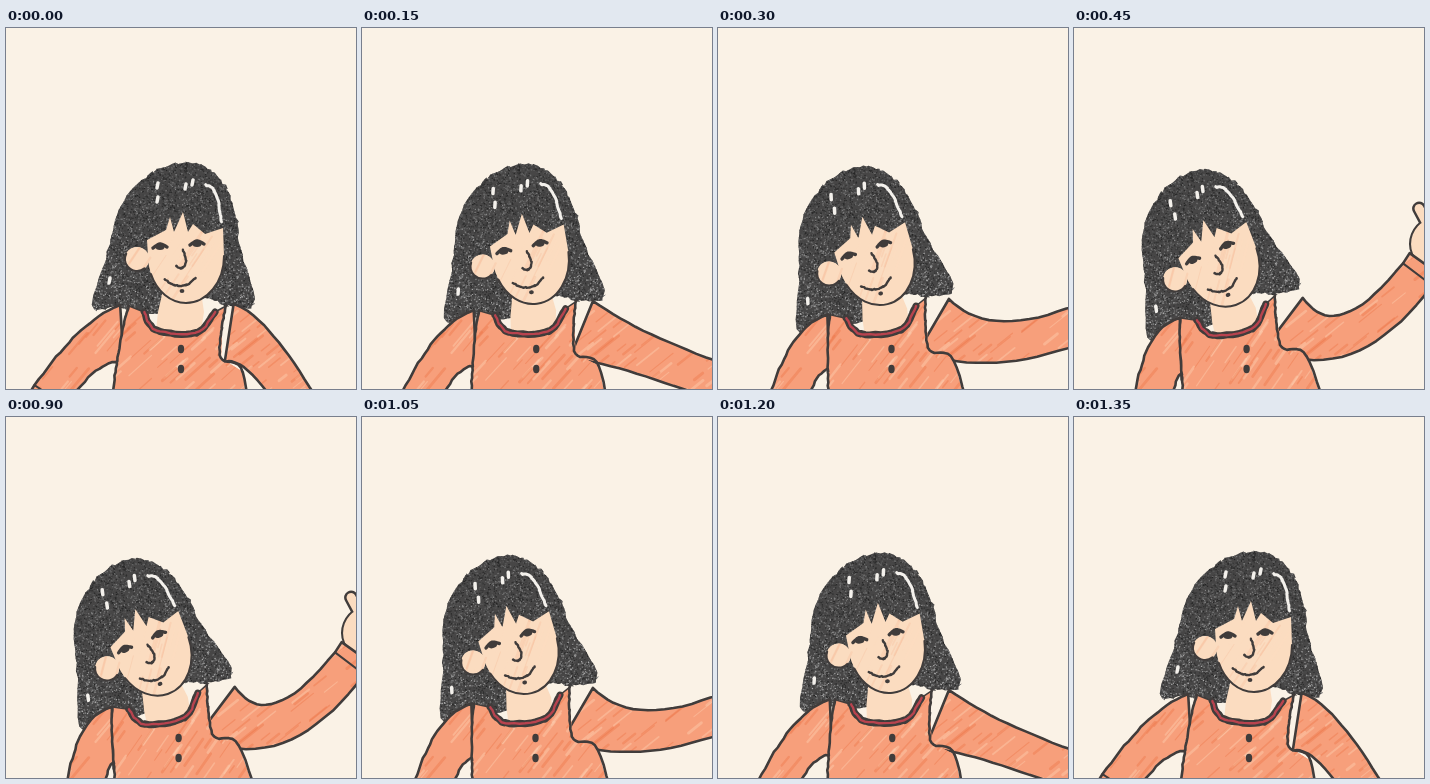
Recreate the animation shown at these times as an HTML page with a canvas. Size 350 by 361 pixels, loop 1.5 s.

```html
<!DOCTYPE html>
<html lang="en">
<head>
<meta charset="utf-8">
<title>Waving girl</title>
<style>
  html, body { margin: 0; width: 100%; height: 100%; overflow: hidden; background: #faf2e6; }
  canvas { display: block; }
</style>
</head>
<body>
<canvas id="stage" width="350" height="361"></canvas>
<script>
const ctx = document.getElementById('stage').getContext('2d');
const PAPER = '#faf2e6', INK = '#403c3b', SKIN = '#fbdcc0', ORANGE = '#f79f7b';
const STEP = 150;

// lift drives head, torso and hanging arm; elbow and wrist bend the waving arm
const waves = [
  { lift: 0, elbow: [262, 312], wrist: [322, 430] },
  { lift: 0.25, elbow: [290, 330], wrist: [400, 370] },
  { lift: 0.5, elbow: [285, 338], wrist: [400, 278] },
  { lift: 0.8, elbow: [275, 343], wrist: [351, 236] },
  { lift: 1, elbow: [268, 235], wrist: [274, 146] }
];
const sequence = [...waves, ...waves.slice().reverse()];

const lerp = (a, b, t) => a + (b - a) * t;
const radians = degrees => degrees * Math.PI / 180;
let random;
function seed(value) {
  random = () => (value = (value * 16807) % 2147483647) / 2147483647;
}

function polygon(points, closed = true) {
  const path = new Path2D();
  points.forEach(([x, y]) => path.lineTo(x, y));
  if (closed) path.closePath();
  return path;
}

// Samples a Catmull-Rom spline through the points, with a slightly shaky hand
function sketch(points, closed = false, shake = 0.5) {
  const n = points.length, samples = [];
  const at = i => points[closed ? (i + n) % n : Math.max(0, Math.min(n - 1, i))];
  for (let i = 0; i < (closed ? n : n - 1); i++) {
    const [a, b, c, d] = [at(i - 1), at(i), at(i + 1), at(i + 2)];
    for (let t = 0; t <= 1; t += 0.125) {
      samples.push([0, 1].map(k => b[k] + 0.5 * t * (c[k] - a[k] +
        t * (2 * a[k] - 5 * b[k] + 4 * c[k] - d[k] + t * (3 * (b[k] - c[k]) + d[k] - a[k]))) +
        (random() - 0.5) * 2 * shake));
    }
  }
  return polygon(samples, closed);
}

function ellipse(x, y, rx, ry, from = 0, to = 2 * Math.PI) {
  const path = new Path2D();
  path.ellipse(x, y, rx, ry, 0, from, to);
  return path;
}

function fill(path, color = INK) {
  ctx.fillStyle = color;
  ctx.fill(path);
}

function line(path, width = 2.6, color = INK) {
  ctx.strokeStyle = color;
  ctx.lineWidth = width;
  ctx.stroke(path);
}

function placed(x, y, angle, draw) {
  ctx.save();
  ctx.translate(x, y);
  ctx.rotate(angle);
  draw();
  ctx.restore();
}

function crayon(path, color, slope, strength) {
  fill(path, color);
  ctx.save();
  ctx.clip(path);
  ctx.globalAlpha = strength;
  for (let i = 0; i < 420; i++) {
    const x = random() * 370 - 20, y = 120 + random() * 260, reach = 6 + random() * 18;
    line(polygon([[x, y], [x + reach, y + reach * slope]]), 1 + random() * 2,
      random() < 0.45 ? '#ec7448' : '#fdd3b5');
  }
  ctx.restore();
}

function drawHair() {
  const hair = sketch([[87, 278], [104, 215], [118, 173], [147, 144], [180, 134], [204, 142],
    [221, 161], [231, 190], [234, 220], [248, 275], [222, 278], [200, 270], [152, 286], [110, 279]], true, 1.3);
  fill(hair, '#474646');
  ctx.save();
  ctx.clip(hair);
  for (let i = 0; i < 9000; i++) {
    const depth = random();
    const gray = 35 + (90 + 70 * depth) * random() ** 1.6;
    ctx.fillStyle = `rgb(${gray},${gray},${gray})`;
    ctx.fillRect(84 + random() * 168, 130 + depth * 158, 1.2, 1.2);
  }
  ctx.restore();
  for (const [x, y] of [[152, 157], [152, 171], [180, 158], [187, 154], [104, 252]]) {
    line(polygon([[x, y - 2], [x - 1, y + 3]]), 3.5, '#f4f1ec');
  }
  line(sketch([[200, 157], [208, 162], [213, 177], [215, 194]]), 3, '#f4f1ec');
}

function drawNeck() {
  fill(polygon([[157, 262], [152, 284], [150, 303], [195, 303], [198, 284], [195, 264]]), SKIN);
}

function drawFace() {
  const ear = ellipse(131, 231, 12, 12);
  const fringe = [[141, 212], [160, 202], [164, 189], [168, 204], [177, 184], [182, 204],
    [187, 196], [199, 206], [217, 200]];
  const face = polygon(fringe, false);
  face.ellipse(180, 228, 38, 47, 0, 0, Math.PI);
  face.addPath(ellipse(131, 231, 12, 12));
  fill(ear, SKIN);
  crayon(face, SKIN, -1.5, 0.1);
  line(ellipse(131, 231, 12, 12, 0.9, 3.6), 2);
  line(ellipse(180, 228, 38, 47, 0, 2.75), 2);

  for (const [x, y] of [[154, 218], [191, 215]]) {
    line(sketch([[x - 7, y + 2], [x, y - 2], [x + 7, y + 1]], false, 0), 3.4);
    fill(ellipse(x, y + 1, 4.5, 3));
  }
  line(sketch([[177, 222], [180, 233], [176, 240], [170, 238]]), 2.4);
  line(sketch([[159, 251], [168, 257], [180, 257], [190, 250]]), 2.4);
  fill(ellipse(176, 263, 2.4, 2));
}

// A tapering sleeve along a quadratic curve from shoulder to wrist
function drawSleeve(shoulder, elbow, wrist, slope) {
  const edges = [[], []];
  for (let t = 0; t <= 1.001; t += 0.05) {
    const [x, y] = [0, 1].map(k => lerp(lerp(shoulder[k], elbow[k], t), lerp(elbow[k], wrist[k], t), t));
    const [dx, dy] = [0, 1].map(k => lerp(elbow[k] - shoulder[k], wrist[k] - elbow[k], t));
    const reach = (18 + 12 * (1 - t) ** 3 + random()) / Math.hypot(dx, dy);
    edges[0].push([x + dy * reach, y - dx * reach]);
    edges[1].push([x - dy * reach, y + dx * reach]);
  }
  const outline = polygon([...edges[0], ...edges[1].reverse()]);
  crayon(outline, ORANGE, slope, 0.4);
  line(outline);
  line(polygon([edges[0][19], edges[1][1]], false), 2);
}

// Fingers fan out from the palm; the origin is the wrist
function drawHand() {
  const palm = ellipse(2, -23, 24, 25);
  const fingers = [0, 1, 2, 3, 4].map(i => {
    const angle = radians(24 * i - 52), length = 35 + 10 * Math.sin(i * Math.PI / 5.5);
    return polygon([[2, -26], [2 + length * Math.sin(angle), -28 - length * Math.cos(angle)]], false);
  });
  line(palm, 4);
  for (const finger of fingers) {
    line(finger, 14);
    line(finger, 9, SKIN);
  }
  fill(palm, SKIN);
}

// Torso coordinates are relative to the collar
function drawTorso() {
  const left = [[-50, -18], [-56, 4], [-62, 37], [-66, 69], [-70, 125]];
  const right = [[47, -18], [43, 4], [42, 34], [64, 48], [71, 125]];
  const collar = [[-35, -12], [-23, 6], [17, 9], [36, -12]];
  placed(0, 0, 0, () => {
    const coat = polygon([...left.slice().reverse(), ...collar, ...right]);
    fill(coat, ORANGE);
    ctx.clip(coat);
    ctx.translate(-173, -296);
    crayon(polygon([[0, 0], [400, 0], [400, 500], [0, 500]]), ORANGE, -0.9, 0.4);
  });
  line(sketch(left));
  line(sketch(right));
  line(polygon([left[0], collar[0]]), 1.5);
  line(polygon([right[0], collar[3]]), 1.5);
  line(sketch(collar), 7);
  line(sketch(collar), 2.4, '#b8434e');
}

function drawPose({ lift, elbow, wrist }) {
  seed(77);
  const lean = Math.sin(lift * Math.PI / 2);
  const tilt = radians(-14 * lean), chestX = 173 - 17 * lift, chestY = 296;
  const onChest = (x, y) => [chestX + x * Math.cos(tilt) - y * Math.sin(tilt),
    chestY + x * Math.sin(tilt) + y * Math.cos(tilt)];
  const onHead = draw => placed(175 - 31 * lift, 254 + 6 * lift, radians(-20 * lean), () => {
    ctx.translate(-175, -254);
    draw();
  });

  ctx.fillStyle = PAPER;
  ctx.fillRect(0, 0, 350, 361);
  onHead(drawHair);
  onHead(drawNeck);
  drawSleeve(onChest(-57, 12), [lerp(82, 86, lean), lerp(310, 322, lean)],
    [lerp(40, 78, lean), lerp(374, 384, lean)], -1.2);
  const forearm = Math.atan2(wrist[0] - elbow[0], elbow[1] - wrist[1]);
  placed(...wrist, forearm * 0.6, drawHand);
  drawSleeve(onChest(50, 10), elbow, wrist, -0.8);
  placed(chestX, chestY, tilt, drawTorso);
  for (const y of [321, 341]) fill(ellipse(175 - 3 * lift, y, 3.2, 4.2));
  onHead(drawFace);
}

ctx.lineCap = ctx.lineJoin = 'round';
let shown;
function frame() {
  const pose = sequence[Math.floor(performance.now() / STEP) % sequence.length];
  if (pose !== shown) drawPose(shown = pose);
  requestAnimationFrame(frame);
}
frame();
</script>
</body>
</html>
```
